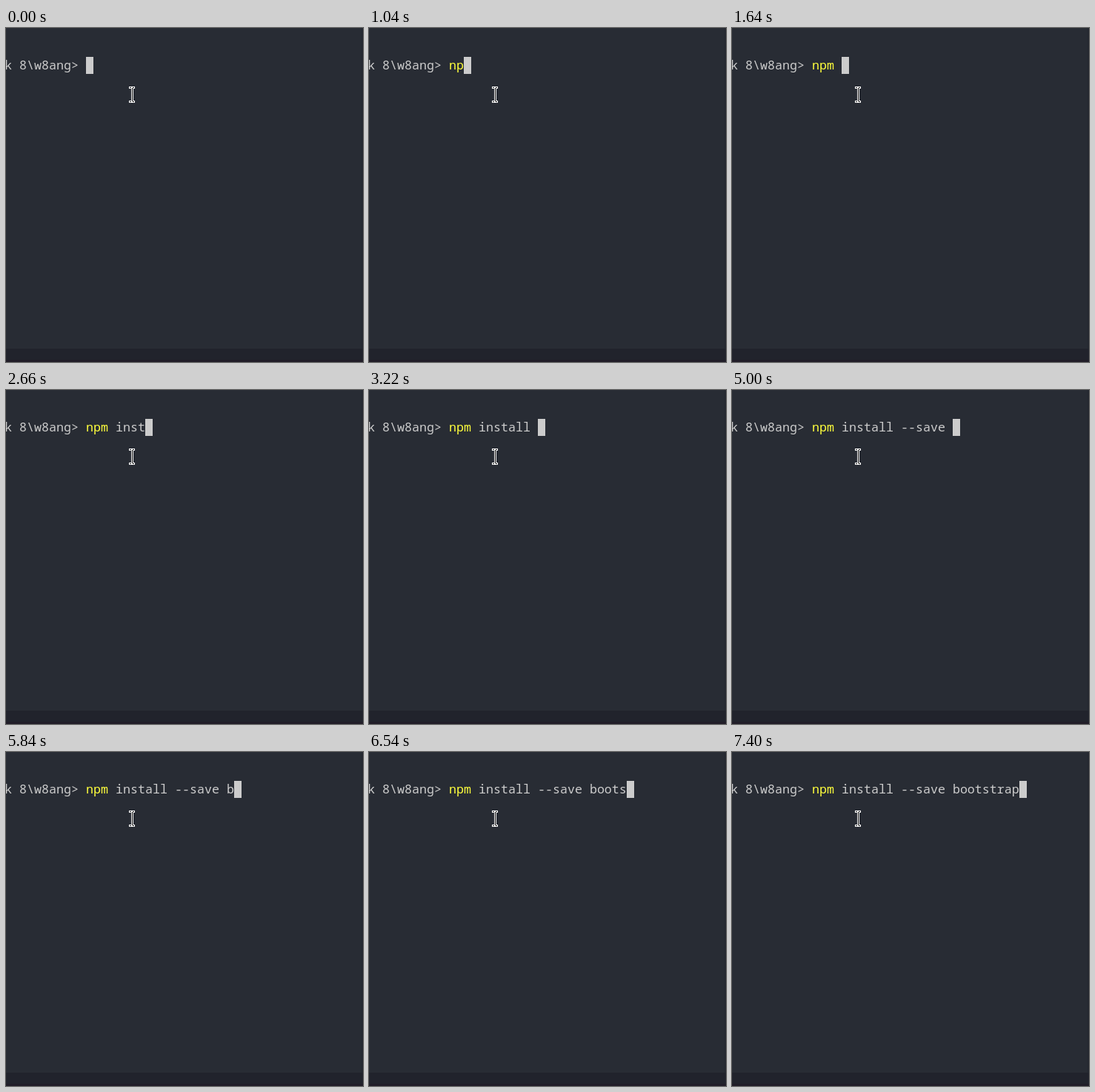
Write an HTML page that moves like this. It is 482 px wide and 451 px high and loops after 8000 ms.

```html
<!DOCTYPE html>
<html lang="en">
<head>
<meta charset="utf-8">
<title>Terminal</title>
<style>
  html, body { margin: 0; width: 100%; height: 100%; overflow: hidden; background: #282c34; }
  svg { display: block; }
  text {
    font: 16.6667px "Noto Sans Mono", "DejaVu Sans Mono", monospace;
    font-variant-ligatures: none;
    white-space: pre;
    fill: #cccccc;
  }
  .command { fill: #ffff3c; }
  .operator { fill: #808080; }
</style>
</head>
<body>
<svg width="482" height="451" viewBox="0 0 482 451">
  <rect width="482" height="451" fill="#282c34"/>
  <rect x="480" width="2" height="433" fill="#24272f"/>
  <rect y="433" width="482" height="18" fill="#21232c"/>
  <rect y="448" width="482" height="3" fill="#211d28"/>
  <text x="-2" y="56">k 8\w8ang&gt;</text>
  <text x="108" y="56"><tspan class="command" id="command"></tspan><tspan id="args"></tspan><tspan id="tail"></tspan></text>
  <rect id="caret" x="108" y="39" width="10" height="23" fill="#cccccc"/>
  <g fill="none" stroke-linecap="square" shape-rendering="crispEdges">
    <path id="beam" d="M167.5 80.5h1.5M172.5 80.5h-1.5M170.5 81.5v17M167.5 99.5h1.5M172.5 99.5h-1.5" stroke="#ffffff" stroke-width="3"/>
    <use href="#core"/>
    <path id="core" d="M167.5 80.5h1M171.5 80.5h1M170.5 81.5v17M167.5 99.5h1M171.5 99.5h1" stroke="#000000"/>
  </g>
</svg>
<script>
  const LOOP = 8000, CELL = 10, START = 108;
  const line = "npm install --save bootstrap";
  // Time at which each character appears; equal times arrive together.
  const keys = [
    870, 1040, 1270, 1640,
    2340, 2430, 2510, 2660, 2800, 2890, 3120, 3220,
    4140, 4290, 4370, 4450, 4680, 4760, 5000,
    5840, 5980, 6070, 6230, 6540, 6770, 7080, 7080, 7400
  ];
  const [command, args, tail, caret] =
    ["command", "args", "tail", "caret"].map(id => document.getElementById(id));
  let shown = -1;

  function draw(count) {
    const typed = line.slice(0, count);
    // A bare "--" is highlighted as an operator until a letter follows.
    const split = typed.endsWith("--") ? count - 2 : count;
    command.textContent = typed.slice(0, 3);
    args.textContent = typed.slice(3, Math.max(3, split));
    tail.textContent = typed.slice(split);
    tail.setAttribute("class", "operator");
    caret.setAttribute("x", START + CELL * count);
  }

  function tick() {
    const t = performance.now() % LOOP;
    const count = keys.filter(k => k <= t).length;
    if (count !== shown) draw(shown = count);
    requestAnimationFrame(tick);
  }
  tick();
</script>
</body>
</html>
```
